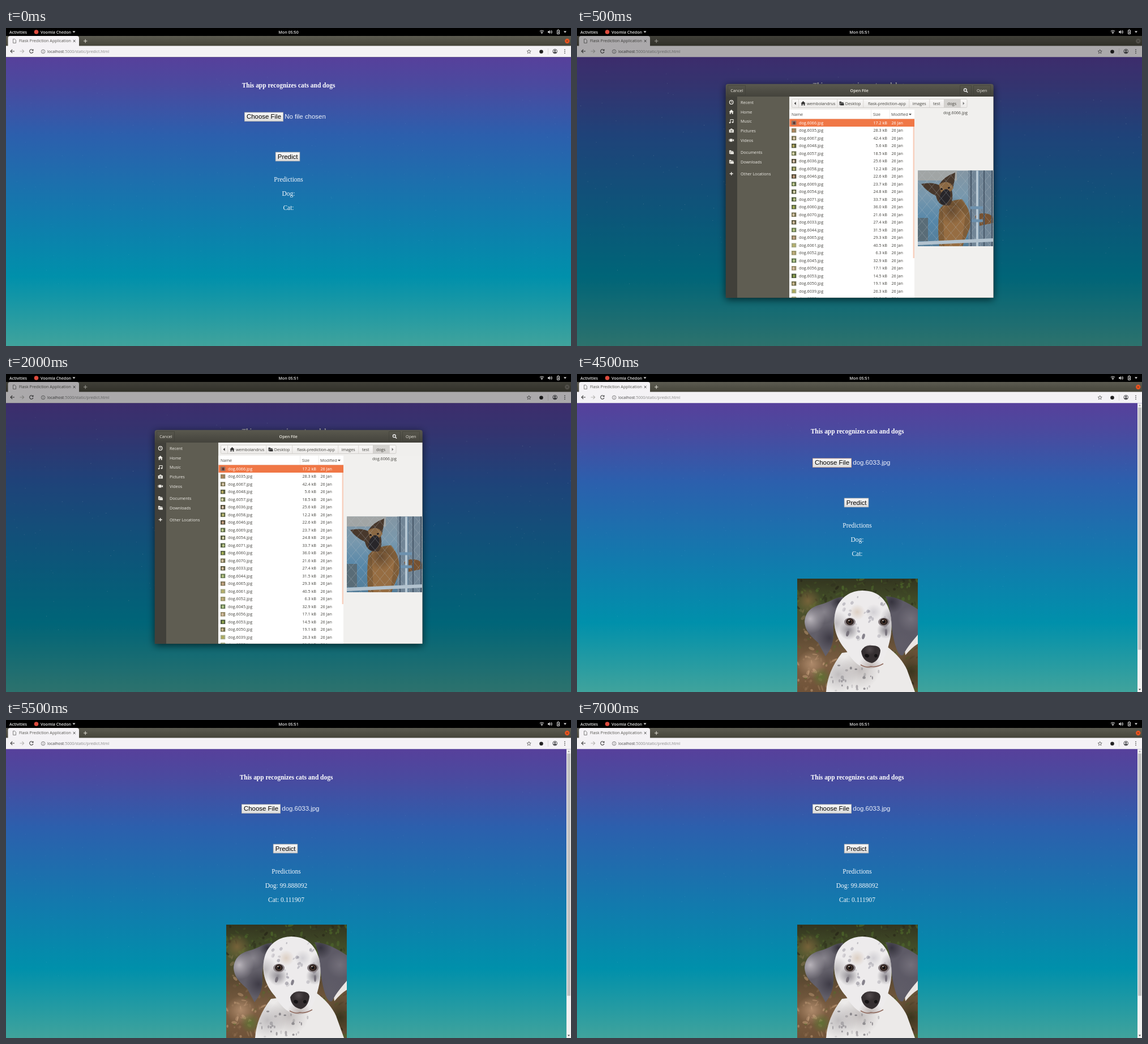
Write an HTML page with a canvas that moves like this. It is 998 px wide and 561 px high and loops after 8 s.

```html
<!DOCTYPE html>
<html lang="en">
<head>
<meta charset="utf-8">
<title>Prediction app demo</title>
<style>
  html, body { margin: 0; width: 100%; height: 100%; overflow: hidden; background: #000; }
  canvas { display: block; width: 998px; height: 561px; }
</style>
</head>
<body>
<canvas id="stage" width="998" height="561"></canvas>
<script>
const ctx = document.getElementById('stage').getContext('2d');
const UI = '"Open Sans", "Noto Sans", sans-serif';
const SERIF = '"Liberation Serif", serif';
const SANS = '"Liberation Sans", sans-serif';

const FILES = ('6066 17.2,6035 28.3,6067 42.4,6048 5.6,6057 18.5,6036 25.6,6058 12.2,6046 22.6,' +
  '6069 23.7,6054 24.8,6071 33.7,6060 36.0,6070 21.6,6033 27.4,6044 31.5,6065 29.3,6061 40.5,' +
  '6052 6.3,6045 32.9,6056 17.1,6053 14.5,6050 19.1,6039 26.3,6038 21.0').split(',').map(f => f.split(' '));

function seeded(seed) {
  return () => (seed = (seed * 16807) % 2147483647) / 2147483647;
}
function rect(x, y, w, h, fill) {
  ctx.fillStyle = fill;
  ctx.fillRect(x, y, w, h);
}
function fade(y0, y1, ...colors) {
  const g = ctx.createLinearGradient(0, y0, 0, y1);
  colors.forEach((c, i) => g.addColorStop(i / (colors.length - 1), c));
  return g;
}
// Soft round glow; the colour is an "r,g,b" triple.
function glow(x, y, r, rgb, alpha) {
  const g = ctx.createRadialGradient(x, y, 0, x, y, r);
  g.addColorStop(0, `rgba(${rgb},${alpha})`);
  g.addColorStop(1, `rgba(${rgb},0)`);
  rect(x - r, y - r, 2 * r, 2 * r, g);
}
function fill(d, color) {
  ctx.fillStyle = color;
  ctx.fill(new Path2D(d));
}
function line(d, color, width = 1) {
  ctx.strokeStyle = color;
  ctx.lineWidth = width;
  ctx.stroke(new Path2D(d));
}
function oval(x, y, rx, ry, color, angle = 0) {
  ctx.beginPath();
  ctx.ellipse(x, y, rx, ry, angle, 0, 7);
  ctx.fillStyle = color;
  ctx.fill();
}
function ring(x, y, r, color, width = 1) {
  ctx.beginPath();
  ctx.arc(x, y, r, 0, 7);
  ctx.strokeStyle = color;
  ctx.lineWidth = width;
  ctx.stroke();
}
function text(s, x, y, font, color, align = 'left') {
  ctx.font = font;
  ctx.fillStyle = color;
  ctx.textAlign = align;
  ctx.fillText(s, x, y);
}
const label = (s, x, y, color, align) => text(s, x, y, '7.2px ' + UI, color, align);
const strong = (s, x, y, color, align) => text(s, x, y, '600 7.1px ' + UI, color, align);
const caret = (x, y, color) => fill(`M${x - 2.5} ${y - 1.2}h5l-2.5 2.8z`, color);
function inside(d, draw) {
  ctx.save();
  ctx.clip(new Path2D(d));
  draw();
  ctx.restore();
}
const clipped = (x, y, w, h, draw) => inside(`M${x} ${y}h${w}v${h}h${-w}z`, draw);

function topBar(clock) {
  rect(0, 0, 998, 14, '#000');
  strong('Activities', 6, 9.5, '#e4e4e4');
  oval(53.5, 7, 3.8, 3.8, '#dd4b3e');
  strong('Voomla Chedon', 61, 9.5, '#e4e4e4');
  caret(120, 6.8, '#ddd');
  strong(clock, 499, 9.5, '#e4e4e4', 'center');
  line('M943 5.8q3.5-3 7 0M944.5 7.7q2-1.6 4 0', '#ddd', 1.1);
  oval(946.5, 9.3, 1, 1, '#ddd');
  fill('M957 5.7h1.7l2-2v6.6l-2-2H957z', '#ddd');
  line('M962 5q1.5 2 0 4M963.5 4q2.2 3 0 6', '#ddd', .9);
  line('M973.5 4h4v6.5h-4zM974.7 3h1.6', '#ddd');
  rect(975, 6, 1.3, 3, '#ddd');
  caret(987.5, 6.8, '#ddd');
}

function browser(dim) {
  rect(0, 14, 998, 18, fade(14, 32, '#5c5b51', '#454439'));
  fill('M3.5 32V18q0-4 4-4H125q4 0 4 4V32z', '#f4f2f5');
  rect(0, 31.5, 998, 20, '#f4f2f5');
  line('M12.5 19.5h3l2 2v5h-5z', '#666', .8);
  label('Flask Prediction Application', 23, 25.4, '#55544f');
  line('M118.7 21l3.8 3.8m0-3.8l-3.8 3.8', '#444', 1);
  line('M137 23h6.4m-3.2-3.2v6.4', '#dedbd2', 1.1);
  oval(991.3, 23, 4.2, 4.2, dim ? '#75736a' : '#e95420');
  line('M989.8 21.5l3 3m0-3l-3 3', dim ? '#3b3a35' : '#6b2a13', .8);

  line('M15 41H8.2m3-3.2L8 41l3.2 3.2', '#444', 1.1);
  line('M24.5 41h7m-3-3.2l3.2 3.2-3.2 3.2', '#b5b4b2', 1.1);
  line('M47.4 39a3.2 3.2 0 1 0 .5 3M48 37.5v2.3h-2.4', '#444', 1.1);
  ring(65.6, 41.5, 3.3, '#666', .8);
  line('M65.6 41v2.3m0-4v.9', '#666', .8);
  const font = '7px ' + UI;
  text('localhost', 73, 44.2, font, '#444');
  const hostWidth = ctx.measureText('localhost').width;
  text(':5000/static/predict.html', 73 + hostWidth, 44.2, font, '#888');
  line('M923.7 38l1 2.4 2.5.2-1.9 1.7.6 2.5-2.2-1.4-2.2 1.4.6-2.5-1.9-1.7 2.5-.2z', '#555', .8);
  oval(945.5, 41.7, 3.3, 3.3, '#222');
  rect(957, 36, .7, 11, '#d2d0ce');
  ring(969.7, 41.2, 3.8, '#45464a', 1);
  oval(969.7, 40, 1.5, 1.5, '#45464a');
  oval(969.7, 43.3, 2.7, 1.3, '#45464a');
  for (const y of [38.4, 41.4, 44.4]) oval(987, y, .8, .8, '#444');
}

function sky(dim) {
  const g = ctx.createLinearGradient(0, 51, 0, 561);
  [[0, '#57409b'], [.1, '#4a4a9f'], [.27, '#2c5fad'], [.55, '#117bad'], [.76, '#0090ab'], [1, '#40a39c']]
    .forEach(([at, c]) => g.addColorStop(at, c));
  rect(0, 51.4, 998, 510, g);
  const rnd = seeded(77);
  for (let i = 0; i < 300; i++) {
    const x = rnd() * 998, y = 60 + (rnd() + rnd()) * 205, a = rnd();
    rect(x, y, .9, .9, `rgba(190,225,245,${a * (dim ? .6 : .2)})`);
  }
}

function button(s, x, y, w, border) {
  rect(x, y, w, 16.5, border);
  rect(x + .8, y + .8, w - 1.6, 14.9, fade(y, y + 16, '#f8f8f8', '#dcdcdc'));
  text(s, x + w / 2, y + 11.8, '11.44px ' + SANS, '#000', 'center');
}

function page(mid, file, dog, cat, focused) {
  const left = mid === 499 ? 421 : 416;
  text('This app recognizes cats and dogs', mid, 105.4, 'bold 11.44px ' + SERIF, '#fff', 'center');
  button('Choose File', left, 148.5, 69, focused ? '#c79a80' : '#a9a9a9');
  text(file, left + 71.3, 160.3, '11.44px ' + SANS, '#eef3fb');
  button('Predict', mid - 23.2, 218.7, 43.5, '#a9a9a9');
  ['Predictions', 'Dog: ' + dog, 'Cat: ' + cat].forEach((s, i) =>
    text(s.trim(), mid, 270.6 + i * 25, '11.44px ' + SERIF, '#f4f8fc', 'center'));
}

function scrollbar() {
  rect(990, 51.4, 8, 510, '#f1f1f1');
  rect(991.2, 59, 5.8, 427.5, '#c1c1c1');
  fill('M992 56.5h4l-2-2.5z', '#999');
  fill('M992 555.5h4l-2 2.5z', '#444');
}

function undergrowth() {
  rect(389, 361, 213, 200, fade(361, 561, '#33351f', '#46532b', '#5d4a32', '#7d5f43', '#6f5238'));
  const rnd = seeded(9);
  for (let i = 0; i < 500; i++) {
    const x = 389 + rnd() * 213, y = 361 + rnd() * 200, low = y > 412 && x < 480;
    const grass = rnd() < (low ? .2 : .7);
    const tone = grass ? '82,112,44' : low ? '196,158,122' : '34,30,20';
    oval(x, y, 1.5 + rnd() * 4, .8 + rnd() * 2, `rgba(${tone},${rnd() * .6})`, rnd() * 3);
  }
  glow(415, 512, 26, '205,165,132', .6);
  glow(408, 400, 24, '170,120,76', .5);
  glow(432, 535, 18, '86,122,48', .7);
  glow(590, 525, 42, '44,44,22', .8);
}

function puppy() {
  undergrowth();
  const body = 'M549 482Q573 500 583 522L597 561H440Q442 525 468 492z';
  const leftEar = 'M470 393C452 395 444 404 429 407C413 411 403 421 402 437C403 455 415 464 426 474L439 498C449 486 454 471 453 453C453 429 458 414 470 405z';
  const rightEar = 'M545 392C565 393 582 402 602 415V460C594 470 584 480 576 496C567 500 561 477 557 455C553 429 554 410 545 392z';
  const head = 'M504 382C530 382 546 396 553 421C558 444 555 463 550 480C544 503 536 519 520 519C498 521 485 503 475 487C458 468 449 441 458 414C466 393 484 382 504 382z';
  const spots = seeded(31);

  ctx.filter = 'blur(.6px)';
  fill('M578 480Q594 470 602 456V476Q592 482 580 496z', '#ebe6e3');
  fill(body, '#eceae9');
  inside(body, () => {
    glow(462, 530, 32, '150,146,150', .5);
    glow(500, 522, 34, '165,158,158', .6);
    for (let i = 0; i < 30; i++)
      oval(448 + spots() * 90, 510 + spots() * 51, 1 + spots() * 2, 1 + spots() * 2.5, `rgba(85,82,90,${.15 + spots() * .45})`);
  });

  fill(leftEar, '#625f69');
  inside(leftEar, () => {
    glow(412, 432, 26, '205,200,206', .8);
    glow(436, 420, 20, '160,156,164', .6);
    glow(446, 466, 24, '48,45,56', .7);
    glow(462, 402, 14, '40,38,46', .8);
  });
  fill(rightEar, '#5d5a66');
  inside(rightEar, () => {
    glow(590, 432, 24, '130,126,136', .6);
    glow(556, 402, 20, '44,42,52', .8);
    glow(572, 478, 24, '98,95,105', .6);
  });

  fill(head, '#edebec');
  inside(head, () => {
    glow(458, 440, 22, '160,156,160', .6);
    glow(556, 430, 20, '150,146,152', .7);
    glow(495, 420, 14, '205,180,155', .5);
    glow(524, 420, 14, '170,168,178', .4);
    glow(480, 452, 17, '90,86,96', .65);
    glow(545, 452, 15, '90,86,96', .65);
    glow(518, 518, 22, '150,135,130', .6);
    for (let i = 0; i < 26; i++)
      oval(466 + spots() * 82, 392 + spots() * 78, 1 + spots() * 2, 1.5 + spots() * 2.5, `rgba(105,102,118,${.1 + spots() * .35})`, spots());
  });
  oval(506, 463, 2.5, 5, '#85818b', .3);
  oval(478, 458, 2.5, 5, '#77727b', .3);
  oval(546, 456, 2, 6, '#77727b');
  for (const x of [482, 542]) {
    oval(x, 437.5, 10, 7.5, '#8c8386');
    oval(x, 437, 7, 6, '#2c2321');
    oval(x, 437, 4.2, 4.2, '#4d372e');
    oval(x, 437, 2.6, 2.6, '#100e0f');
    oval(x - 1.5, 435, 1.1, 1.1, '#ddd');
  }
  fill('M502 489Q508 477 521 479Q535 479 536 488Q534 506 521 510Q504 507 502 489z', '#352f31');
  glow(517, 486, 10, '110,100,104', .5);
  oval(512, 497, 4, 3, '#151314', .4);
  oval(528, 497, 3, 3, '#151314', -.4);
  line('M501 513Q511 519 519 516Q529 518 541 511', '#8f6a5e', 1.6);
  ctx.filter = 'none';
}

function kennel() {
  rect(602, 251, 133, 134, fade(251, 385, '#8496a3', '#7898ad', '#5687a9', '#547d98'));
  rect(602, 251, 69, 18, '#a1a5a5');
  rect(602, 335, 18, 41, '#596c77');
  rect(691, 251, 44, 134, '#718596');
  fill('M640 320Q652 304 680 302Q698 322 694 352L681 385H640Q636 357 640 320z', '#7f5d38');
  fill('M646 313Q676 309 686 331L679 385H649z', '#966d42');
  glow(662, 322, 24, '70,52,36', .6);
  fill('M608 275Q628 271 639 277Q648 262 668 255Q667 277 662 286Q666 304 658 313Q638 316 634 296Q618 289 608 275z', '#48382c');
  fill('M639 276Q658 265 665 282Q660 293 643 290z', '#8a6843');
  oval(650, 298, 9, 14, '#28262a', .3);
  oval(644, 284, 2, 1.5, '#191518');
  oval(657, 282, 2, 1.5, '#191518');
  fill('M703 332Q719 321 735 333V344L711 349z', '#765232');
  let mesh = '';
  for (let k = -7; k < 9; k++)
    mesh += `M${602 + k * 17} 251l112 134M${602 + k * 17 + 100} 251l-112 134`;
  line(mesh, '#b6c1c766', .8);
  line('M696 251V385M719 251V385M733 251V385', '#48596a', 2);
  line('M708 251V385', '#b5c6d2', 6);
  line('M710 251V385', '#68859c', 2);
  line('M602 380L735 374', '#b2c2ce', 6);
  line('M695 317h22M697 340h20', '#6d91ae', 5);
}

function sidebar() {
  rect(263, 121, 20, 355, '#41403a');
  rect(283, 121, 92, 355, '#5f5d52');
  const rows = [['Recent', 131], ['Home', 148], ['Music', 164.5], ['Pictures', 181], ['Videos', 198],
    ['Documents', 219], ['Downloads', 236], ['Other Locations', 257]];
  for (const [s, y] of rows) label(s, 289, y + 2.6, '#eeece6');
  const c = '#eeece6';
  ring(272.7, 131, 3.3, c, 1.2);
  line('M272.7 129v2h1.7', c, .9);
  house(272.7, 148, c);
  line('M271 167v-5.5h5v4.5', c, 1.1);
  oval(270, 167, 1.4, 1.2, c);
  oval(275, 166.3, 1.4, 1.2, c);
  fill('M268.7 179h2l1-1.5h2.2l1 1.5h2v5.5h-8.2z', c);
  ring(272.8, 181.6, 1.4, '#41403a', .8);
  fill('M270 195.5h4.5v5H270zM274.8 197.5l2.3-1.8v4.5l-2.3-1.8zM268.5 196h1v4h-1z', c);
  folder(272.7, 219, c);
  folder(272.7, 236, c);
  line('M269.7 257h6m-3-3v6', c, 1.3);
}
const house = (x, y, c) => fill(`M${x - 4.2} ${y}l4.2-4 4.2 4h-1.2v3.7h-2v-2.5h-2v2.5h-2v-3.7z`, c);
const folder = (x, y, c) => fill(`M${x - 3.8} ${y - 3.2}h3l1 1.2h3.2v1.2h-6v3.8h-1.2zM${x - 2.2} ${y - .2}h6.4v3.6h-6.4z`, c);

function pathBar() {
  rect(375, 121, 361, 23, '#f0efed');
  ctx.beginPath();
  ctx.roundRect(379.5, 125.5, 309.5, 15, 2);
  ctx.fillStyle = fade(125, 141, '#faf9f8', '#ebe9e7');
  ctx.fill();
  ctx.strokeStyle = '#cfccc8';
  ctx.lineWidth = .8;
  ctx.stroke();
  rect(648, 125.5, 29, 15, '#d4d2cf');
  for (const x of [391, 459.5, 505.5, 586.5, 622.5, 648, 677]) rect(x, 125.5, .7, 15, '#cfccc8');
  fill('M386.6 130.3v5.4l-2.8-2.7z', '#333');
  fill('M681.6 130.3v5.4l2.8-2.7z', '#777');
  house(399.5, 133, '#333');
  folder(467.3, 133, '#333');
  const parts = [['wembolandrus', 406], ['Desktop', 473.7], ['flask-prediction-app', 514],
    ['images', 592.7], ['test', 629], ['dogs', 654]];
  for (const [s, x] of parts) label(s, x, 135.6, '#45443f');
}

function fileList() {
  rect(375, 144, 221, 332, '#fff');
  label('Name', 379, 154.7, '#4c4b47');
  label('Size', 523, 154.7, '#4c4b47');
  label('Modified', 555, 154.7, '#4c4b47');
  caret(588.5, 152.5, '#444');
  rect(375, 160, 221, .6, '#dcdad7');
  rect(519, 144, .6, 16, '#e2e0de');
  rect(552, 144, .6, 16, '#e2e0de');
  const rnd = seeded(5);
  FILES.forEach(([id, size], i) => {
    const y = 167.2 + i * 13.5, color = i ? '#45443f' : '#fff';
    if (!i) rect(375.5, 160.5, 220.5, 13.5, '#f07746');
    const hue = rnd() * 80 + 20;
    rect(379, y - 3.7, 8.3, 7.6, `hsl(${hue} 18% ${25 + rnd() * 35}%)`);
    oval(382 + rnd() * 2, y + .4, 2, 2.5, `hsl(${hue - 15} 38% ${i ? 45 + rnd() * 35 : 28}%)`);
    label(`dog.${id}.jpg`, 392, y + 2.5, color);
    label(size + ' kB', 548, y + 2.5, color, 'right');
    label('26 Jan', 555.5, y + 2.5, color);
  });
  rect(593.6, 174, 2.4, 232, '#f7cfbd');
}

function dialog() {
  ctx.save();
  ctx.shadowColor = 'rgba(0,0,0,.65)';
  ctx.shadowBlur = 14;
  ctx.shadowOffsetY = 3;
  ctx.beginPath();
  ctx.roundRect(262.7, 98.7, 473, 377.3, [4, 4, 0, 0]);
  ctx.fillStyle = fade(98, 121, '#5a594f', '#44433c');
  ctx.fill();
  ctx.restore();
  line('M266.5 101.5h31v17h-31zM676.5 101.5h20v17h-20zM700.5 101.5h30v17h-30z', '#3f3e38', .6);
  label('Cancel', 282.3, 112.7, '#e8e5dc', 'center');
  strong('Open File', 498.7, 112.7, '#eeebe2', 'center');
  label('Open', 715.3, 112.7, '#e8e5dc', 'center');
  ring(685.8, 109.4, 2.4, '#eee', 1.3);
  line('M687.5 111.2l2.6 2.6', '#eee', 1.5);
  clipped(263, 121, 472.5, 354.8, () => {
    sidebar();
    pathBar();
    fileList();
    rect(596, 144, 140, 332, '#f1f0ee');
    label('dog.6066.jpg', 668.5, 152.4, '#45443f', 'center');
    clipped(602, 251.5, 133.5, 133.5, kennel);
  });
}

function draw(now) {
  const t = now % 8000;
  const picking = t >= 500 && t < 3000, chosen = t >= 3000, predicted = t >= 5500;
  browser(picking);
  sky(picking);
  if (chosen) {
    page(495, 'dog.6033.jpg', predicted ? '99.888092' : '', predicted ? '0.111907' : '', !predicted);
    clipped(389, 361, 213, 200, puppy);
    scrollbar();
  } else {
    page(499, 'No file chosen', '', '');
  }
  if (picking) {
    rect(0, 14, 998, 547, 'rgba(0,0,0,.3)');
    dialog();
  }
  topBar(t < 500 ? 'Mon 05:50' : 'Mon 05:51');
}

let start;
function tick(now) {
  start ??= now;
  draw(now - start);
  requestAnimationFrame(tick);
}
requestAnimationFrame(tick);
</script>
</body>
</html>
```
